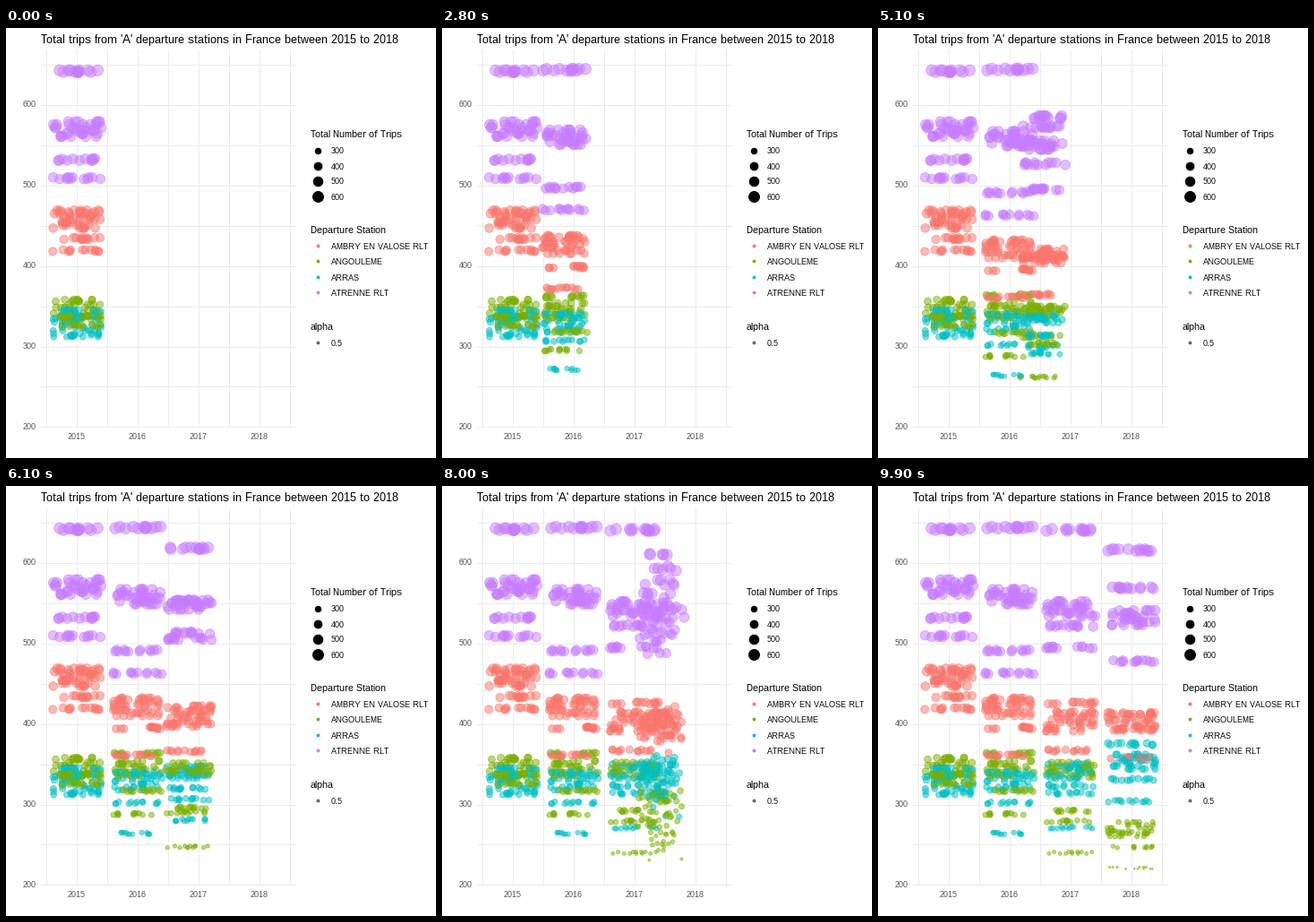
Recreate the animation shown at these times as a matplotlib script. Size 480 by 480 pixels, loop 10 s.

```python
import numpy as np
import matplotlib.pyplot as plt
from matplotlib.animation import FuncAnimation
from matplotlib.colors import to_rgba

plt.rcParams.update({
    "font.family": "Liberation Sans",
    "text.hinting": "native",   # crisp, pixel-fitted glyphs
    "text.hinting_factor": 1,
})

YEARS = range(2015, 2019)
FRAMES, STEP = 100, 33   # frames per loop, frames per year
CAUSES = 6               # rows sharing one monthly total
MONTHS = 12
rng = np.random.default_rng(15)

# Per station: colour, then for each year the core level and three side levels
STATIONS = {
    "AMBRY EN VALOSE RLT": ("#F8766D", [
        (455, 467, 418, 433), (418, 430, 394, 360),
        (399, 425, 366, 413), (402, 412, 392, 357)]),
    "ANGOULEME": ("#7CAE00", [
        (342, 356, 325, 336), (344, 362, 316, 287),
        (342, 291, 239, 278), (268, 264, 246, 220)]),
    "ARRAS": ("#00BFC4", [
        (324, 343, 335, 312), (326, 338, 301, 263),
        (340, 322, 313, 270), (352, 374, 330, 303)]),
    "ATRENNE RLT": ("#C77CFF", [
        (569, 641, 531, 508), (557, 643, 490, 462),
        (542, 640, 521, 494), (531, 615, 568, 477)]),
}


def monthly(core, *sides):
    """Half the year spread around the core, two months at each side level."""
    pairs = [side + d for side in sides for d in (1, -1)]
    return np.concatenate([core + np.linspace(9, -9, 6), pairs])


def px(year):
    return 79 + 68 * (np.asarray(year) - 2015)


def py(trips):
    return 444.4 - 0.8985 * (np.asarray(trips) - 200)


def size_of(trips):
    return 1 + 5 * np.sqrt(np.clip((np.asarray(trips) - 220) / 426, 0, 1))


def area(size):
    """Marker area for a ggplot-style point size."""
    return (0.75 * (size * 2.845 + 0.945) - 1) ** 2


def build():
    """Positions and sizes per year, ordered by month, station, cause."""
    xy, sizes = [], []
    for k, year in enumerate(YEARS):
        totals = np.array([monthly(*keys[k]) for _, keys in STATIONS.values()])
        if k >= 2:
            totals = np.roll(totals, 2, axis=1)
        trips = np.repeat(totals, CAUSES, axis=1)
        if k == 3:
            trips = rng.permuted(trips, axis=1)
        trips = trips.reshape(-1, MONTHS, CAUSES).swapaxes(0, 1).ravel()
        x = px(year + rng.uniform(-0.4, 0.4, trips.size))
        xy.append(np.column_stack([x, py(trips)]))
        sizes.append(size_of(trips))
    return xy, sizes


xy, sizes = build()
colors = [to_rgba(color, 0.5) for color, _ in STATIONS.values()]
point_colors = np.tile(np.repeat(colors, CAUSES, axis=0), (MONTHS, 1))

fig = plt.figure(figsize=(480 / 72, 480 / 72), dpi=72, facecolor="white")
ax = fig.add_axes([0, 0, 1, 1])
ax.set_xlim(0, 480)
ax.set_ylim(480, 0)
ax.axis("off")


def label(x, y, text, size=9, color="black", ha="left"):
    ax.text(x, y, text, fontsize=size, color=color, ha=ha, va="baseline")


def dots(points, size, color):
    x, y = np.transpose(points)
    return ax.scatter(x, y, s=area(size), facecolors=color,
                      edgecolors=color, linewidths=1, zorder=2)


def draw_panel():
    grid = dict(color="#EBEBEB", linewidth=1, zorder=0)
    for v in range(200, 651, 50):
        ax.plot([39, 323], [py(v) + 1] * 2, **grid)
    for x in range(45, 323, 34):
        ax.plot([x, x], [24, 445], **grid)
    for v in range(200, 601, 100):
        label(34, py(v) + 3.5, str(v), color="#4D4D4D", ha="right")
    for year in YEARS:
        label(px(year), 459, str(year), color="#4D4D4D", ha="center")
    label(39, 17, "Total trips from 'A' departure stations in France "
                  "between 2015 to 2018", 13)


def draw_legends():
    label(340, 122, "Total Number of Trips", 11)
    for i, v in enumerate(range(300, 601, 100)):
        y = 136.5 + 17 * i
        dots([(348.3, y)], size_of(v), "black")
        label(363, y + 4, str(v))
    label(340, 229, "Departure Station", 11)
    for i, (name, (color, _)) in enumerate(STATIONS.items()):
        y = 243 + 17.4 * i
        dots([(348, y)], 1.5, color)
        label(363, y + 4, name)
    label(340, 337, "alpha", 11)
    dots([(348, 351)], 1.5, (0, 0, 0, 0.5))
    label(363, 355, "0.5")


draw_panel()
draw_legends()
marks = [dots(p, s, point_colors) for p, s in zip(xy[:3], sizes[:3])]
moving = dots(xy[0], sizes[0], point_colors)


def update(i):
    k = min(i // STEP, 2)
    f = i / STEP - k
    moving.set_offsets((1 - f) * xy[k] + f * xy[k + 1])
    moving.set_sizes(area((1 - f) * sizes[k] + f * sizes[k + 1]))
    for n, mark in enumerate(marks):
        mark.set_visible(i > n * STEP)
    return [moving, *marks]


anim = FuncAnimation(fig, update, frames=FRAMES, interval=100,
                     init_func=lambda: update(0), repeat=True, repeat_delay=0)
plt.show()
```
